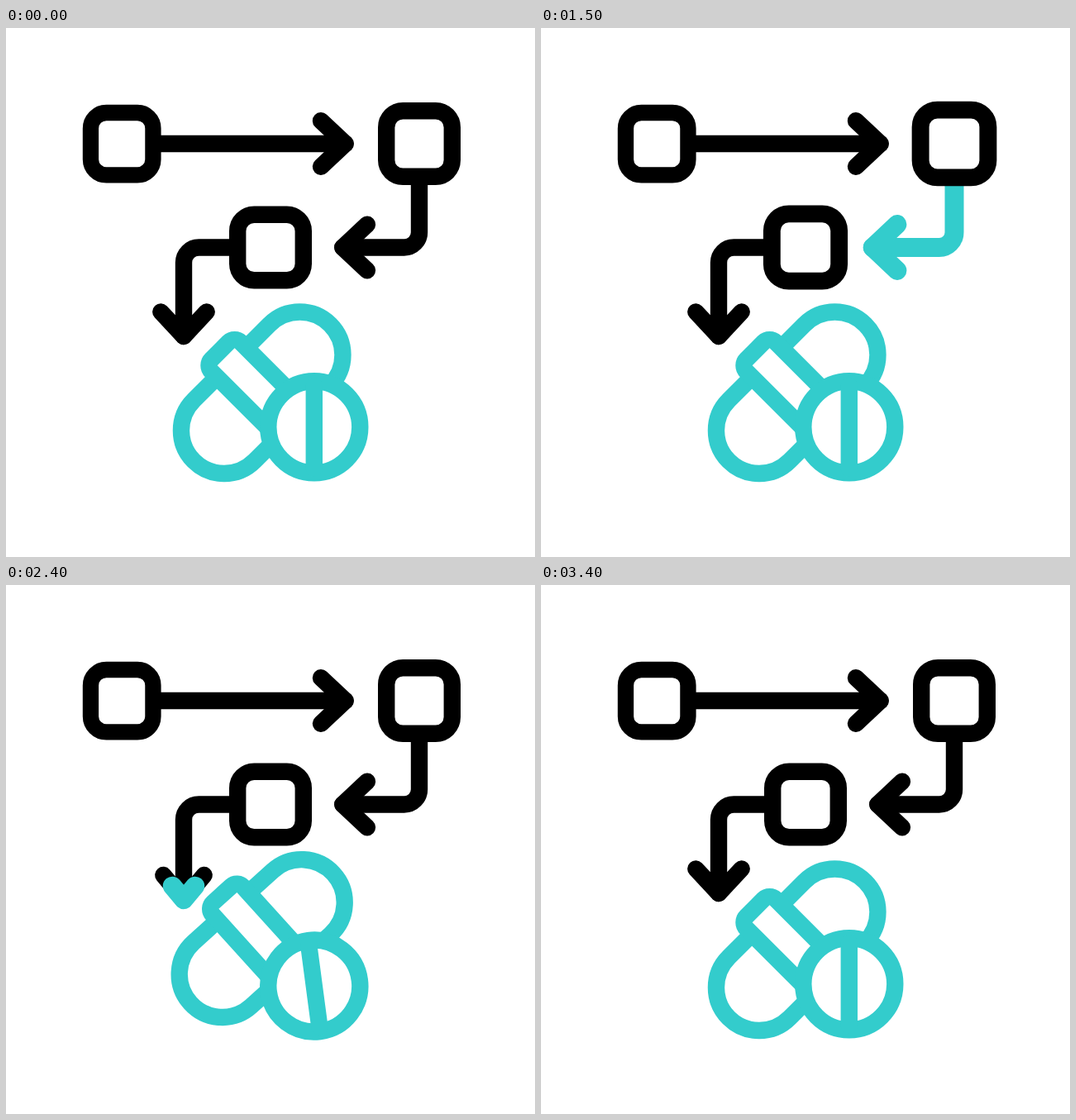
These frames come from a looping animation (640x640 px, 3600 ms). An HTML page:

```html
<!DOCTYPE html>
<html lang="en">
<head>
<meta charset="utf-8">
<title>Process flow</title>
<style>
  html, body { margin: 0; width: 100%; height: 100%; overflow: hidden; background: #fff; }
  svg { display: block; width: 100%; height: 100%; }
  path { fill: none; stroke-linecap: round; stroke-linejoin: round; }
  rect, circle { fill: #fff; }
  .ink { stroke: #000; stroke-width: 20.4; }
  .glow { stroke: #33cccc; stroke-width: 23; }
  .pill { stroke: #33cccc; stroke-width: 20.4; }
</style>
</head>
<body>
<svg viewBox="0 0 640 640">
  <g id="flow"></g>
  <g id="capsule" class="pill">
    <rect x="-116.7" y="-52" width="233.4" height="104" rx="52"/>
    <rect x="-25" y="-71.8" width="50" height="143.6" rx="10.2"/>
  </g>
  <g id="tablet" class="pill">
    <circle r="55.5"/>
    <path d="M0-50V50"/>
  </g>
</svg>
<script>
const LOOP = 3600, STEP = 640;
const flow = document.getElementById('flow');
const capsule = document.getElementById('capsule');
const tablet = document.getElementById('tablet');

// Each step: box centre and size, shaft start, arrow tip and heading.
const steps = [
  { x: 140.2, y: 140.2, size: .948, shaft: 'M178 140H300', tip: [410.6, 140], angle: 0 },
  { x: 500, y: 140, size: 1, shaft: 'M500 180V247.2A18.3 18.3 0 0 1 481.7 265.5', tip: [407.3, 265.5], angle: 180 },
  { x: 320, y: 265.5, size: 1, shaft: 'M280 265.5H233.3A18.3 18.3 0 0 0 215 283.8', tip: [215, 373], angle: 90 }
];

const SCALE = [[160, 1], [310, 1.06], [650, .947], [770, 1.04], [1010, 1]];
const PUSH = [[430, 0], [650, -8], [900, 7], [1100, 8], [1290, -3], [1380, 0]];
const SPREAD = [[430, 0], [650, 4], [900, 0], [1130, -3], [1290, 3], [1380, 0]];

function add(parent, tag, attrs) {
  const el = document.createElementNS('http://www.w3.org/2000/svg', tag);
  for (const k in attrs) el.setAttribute(k, attrs[k]);
  return parent.appendChild(el);
}

for (const s of steps) {
  const line = cls => add(flow, 'path', { class: cls, pathLength: 1 });
  s.shafts = [line('ink'), line('glow')];
  s.heads = [line('ink'), line('glow')];
  s.box = add(flow, 'rect', { class: 'ink', x: -39.8, y: -39.8, width: 79.6, height: 79.6, rx: 20 });
}

const ramp = (t, a, b) => Math.min(1, Math.max(0, (t - a) / (b - a)));

function ease(keys, t) {
  let v = keys[0][1];
  for (let i = 1; i < keys.length; i++) {
    const p = ramp(t, keys[i - 1][0], keys[i][0]);
    v += (keys[i][1] - keys[i - 1][1]) * p * p * (3 - 2 * p);
  }
  return v;
}

// Swings up to amp at time peak, then rings with the given half period and decay.
function spring(t, amp, peak, half, decay) {
  if (t >= 3390) return 0;
  const n = (t - peak) / half;
  if (n < 0) return amp * Math.sin(Math.PI / 2 * ramp(t, Math.max(2060, peak - half / 2), peak));
  return amp * decay ** n * Math.cos(Math.PI * n);
}

function trim(el, from, to) {
  el.style.display = to - from > .001 ? '' : 'none';
  el.setAttribute('stroke-dasharray', `${to - from} 2`);
  el.setAttribute('stroke-dashoffset', -from);
}

function place(el, x, y, angle, scale = 1) {
  el.setAttribute('transform', `translate(${x} ${y}) rotate(${angle}) scale(${scale})`);
}

function drawStep(s, t) {
  const push = ease(PUSH, t), wing = 27.7 + ease(SPREAD, t);
  const a = s.angle * Math.PI / 180;
  const x = s.tip[0] + push * Math.cos(a), y = s.tip[1] + push * Math.sin(a);
  for (const p of s.shafts) p.setAttribute('d', `${s.shaft}L${x} ${y}`);
  for (const p of s.heads) {
    p.setAttribute('d', `M-29.6 ${-wing}L0 0L-29.6 ${wing}`);
    place(p, x, y, s.angle);
  }
  trim(s.shafts[1], ramp(t, 910, 1120), ramp(t, 550, 745));
  const w = Math.min(ramp(t, 730, 800), 1 - ramp(t, 1090, 1160));
  trim(s.heads[1], .5 - w / 2, .5 + w / 2);
  place(s.box, s.x, s.y, 0, s.size * ease(SCALE, t));
}

function draw(now) {
  const t = now % LOOP;
  steps.forEach((s, i) => drawStep(s, t - i * STEP));
  place(capsule, 309.7, 441.3 + spring(t, 29, 2225, 255, .78), -45 + spring(t, -7.3, 2180, 340, .8));
  place(tablet, 372.8, 482.7 + spring(t, 18.3, 2190, 476, .5), spring(t, -12, 2320, 303, .8));
}

const start = performance.now();
function tick() {
  draw(performance.now() - start);
  requestAnimationFrame(tick);
}
tick();
</script>
</body>
</html>
```
